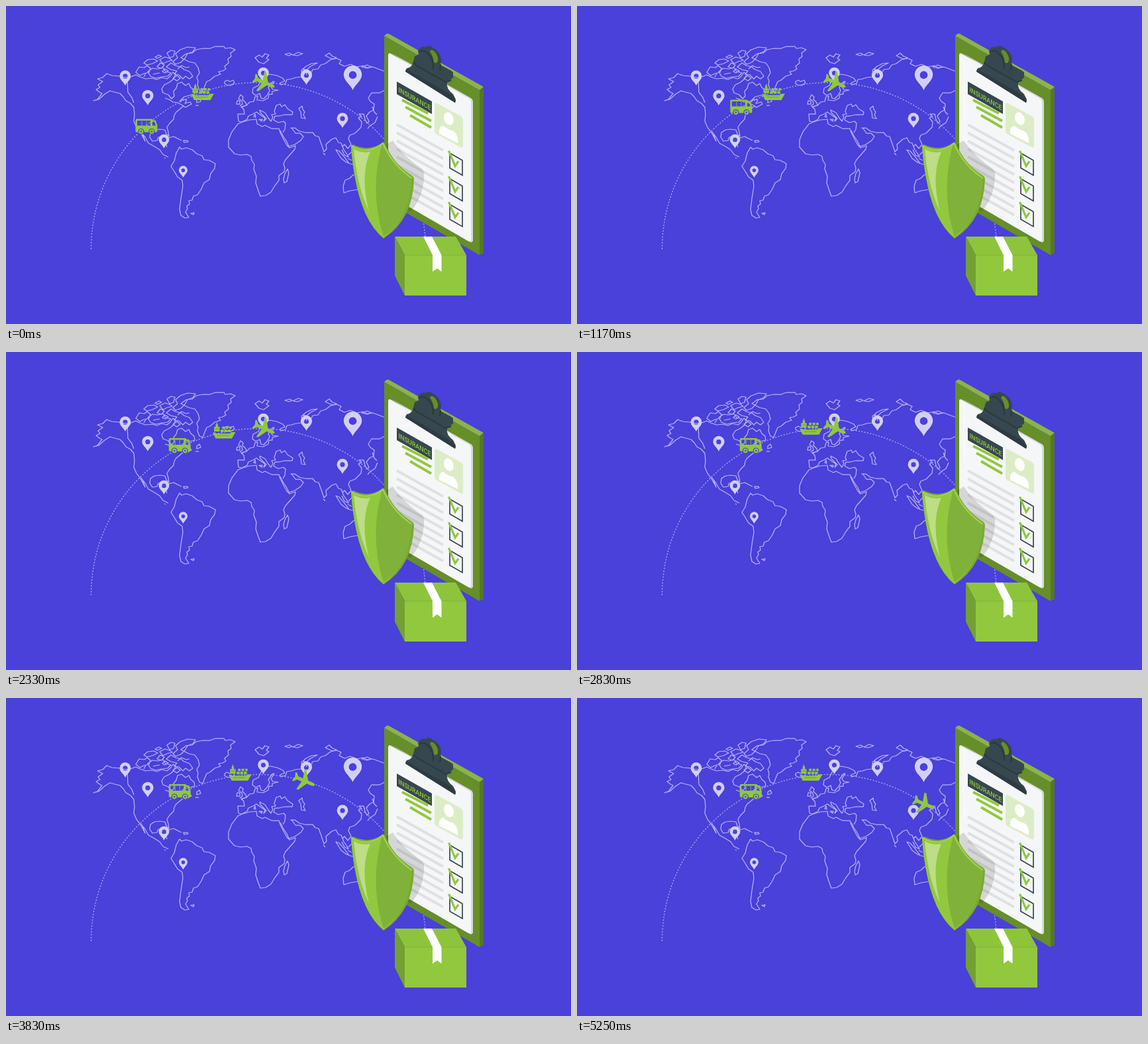
Recreate the animation shown at these times as an HTML page. Size 853 by 480 pixels, loop 5330 ms.

```html
<!DOCTYPE html>
<html lang="en">
<head>
<meta charset="utf-8">
<title>Cargo insurance</title>
<style>
html, body { margin: 0; width: 100%; height: 100%; overflow: hidden; background: #4a40da; }
svg { display: block; width: 100%; height: 100%; }
.map { fill: none; stroke: #b7b1f3; stroke-width: 1.25; stroke-linejoin: round; }
.route { fill: none; stroke: #aaa4ef; stroke-width: 1.4; stroke-dasharray: 2 2.4; }
.pins { fill: #d2cff7; fill-rule: evenodd; }
.icon { fill: #8fc93c; fill-rule: evenodd; }
.label { font: 500 10.4px Roboto, Arial, sans-serif; fill: #92c83e; }
</style>
</head>
<body>
<svg viewBox="0 0 853 480" preserveAspectRatio="none">
  <g class="map">
    <!-- North America -->
    <path d="M138 110l8-2 6-6 8 3 12 1 8 2 8-1 8-3 6 3 9 3 9-1 8 2 7-3 8 2 5-4 4-6 4 3-3 7-6 5-8 4-4 6 2 6 8 3 5 6 4-4-1-7 4-5 2-7 6-2 6 5 5-3 3 6 5 4 1 6-8 2-8 2-7 7 6-3 5 1-3 5 8-2 2 3-9 5-3-2-6 5-5 4-3 5-1 6-6 6-4 6 2 7 1 7-4-4-2-6-8-1-8 1-6 4-1 7 4 6 7-1 2-5 6-1-2 8 7 2 2 6"/>
    <path d="M138 110l8 4-7 5 3 4-6 3 5 4 4 2-7 9-6 2 8-2 9-8 8-5 7 2 8 2 5 5 4 6 7 4 5 6 1 11-1 10 4 9 6 8 7 13-4-11-2-3 6 8 5 9 9 5 8 5 5 7 8 4M183 110l1 20 6 8 3 8"/>
    <path d="M240 139l6 2 6 4 7 1 6 3 4 3M246 199l7-2 8 4 4 2M268 203l6 0 1 2-6 1zM239 229l2 1M286 150l5 0M288 142l4-3 2 5-6 2z"/>
    <!-- Arctic islands -->
    <path d="M196 100l5-8 8 1 4-3 5 4-2 6-8 2-6 3zM208 86l6-5 9-1 6 3-8 4-8 2zM214 99l7-5 8 1 8-2 4 6 8 2-5 5-9 1-9 2-8-3zM228 92l5-6 6 3-4 5zM232 81l8-4 7 2 4 3-8 2-6 3zM242 92l7-6 7 4 8 2 5 4 8 3 5 7-5 4-6-4-4 4-6-6-7-1 4-5-9-2zM243 71l6-4 6 1-2 8-6 2zM252 84l7-6-3-6 7-6 11-4 12 1-4 6-8 3-4 7-6 6-8 3zM225 77l6-3 4 2-7 3zM252 109l6-4 5 4-5 4zM236 99l4-4 5 3-5 3zM208 107l3-5M222 103l10-2M259 95l6-5 7 3 5-1"/>
    <!-- Greenland, Iceland -->
    <path d="M264 78l8-6 9-1 6-5 10-2 11 0 8-3 13 0 2 3 8-1 7 3-7 5 1 5-5 4 1 6-6 5 2 4-5 3-6 1 3 4-9 3-7 6-5 2-3 7-3 8-5-2-3-8 1-6-2-5 4-7-2-8-5-7-9-2zM330 114l4-2 4 2 5-2 2 4-6 4-6-1-3-2z"/>
    <!-- South America -->
    <path d="M257 222l5-9 3 3 7-2 9 3 7 6 8 3 3 6 8 1 9 5-1 7-6 8-2 9-8 5-4 9-6 9-6 2-2 6-5 1 1 5-4 3 1 4-3 5 5 8-6 1-6-4-2-9 2-16 3-19-1-9-7-5-6-10-4-6 5-8zM279 313l5-1-1 3z"/>
    <!-- Europe -->
    <path d="M351 174l-1-11 10 0-1-7-4-4 8-2 5-5 6-1 2-7 4-1-1 6 9 1 8-4 1-6 5 0 0-4 9-2-8-1-3-4 5-8-2 0-7 9 2 5-4 7-5 5-4-1-2-7-6 3-5-4 1-7 8-4 4-8 5-7 9-2 10 2 9 4 3 4-7 3 1 3 7-2 2-6 7-1 6-2 9-1 5-5-2-7 7 2 2 9 5-10 8-1 4-6 7-2 8-6 9-2 7 3-3 5 8 4 9-3 10 4 9-2 6 3 9-1 8 3 8 3 6 1"/>
    <path d="M351 174l5 1 8-4 2-5 7-3 5-3 7 5 6 4-2 5 4-4-9-9-1-4 8 4 5 8 4 5 3-6-2-4 6-1-2-4 3-9 6-2 2 4 5-3 4 6 8 5-1 4-11 0-9 2-6 0-2 6 7 4 8-2 3 3-1 9-3 5M447 151l-5 4 3 5 1 9 6 1-3-6 2-4-3-4zM353 151l4-3-1-5-5-3 3-6 4 3-1 4 5 5 1 4-8 3M348 148l1-5 4 0 0 5zM382 171l5 0-1 3zM374 167l2-4 1 5z"/>
    <path d="M376 78l6-4 5 3 4-5 6 2-4 5 4 2-8 6-7-2zM421 73l7-2 4 2-5 2zM433 74l8-4 7 2-8 3zM447 104l-1-7 7-6 8-4 9-1-10 5-7 6 1 7M482 75l6-4 5 5 6 2-6 2-7-3zM537 92l8-3 7 3-7 2z"/>
    <!-- Africa -->
    <path d="M350 178l7-3 10-3 11-1 1 7 8 4 4-2 10 5 11 0 2 6 5 10 5 9 4 4 9-3-1 5-6 7-8 9-3 6 2 7-1 5-8 6 0 7-6 8-6 10-8 5-8 1-3-8-4-12 1-10-4-11 1-7-4-6-1-6-6-3-10 1-9-2-9-10 0-11 5-12zM425 246l2 6-3 13-4 2-1-6 2-8z"/>
    <!-- Asia -->
    <path d="M414 188l4 8 6 9 3 7 9-3 9-6 4-6-5-5-7 0-5-7-2-1 6 0 7 5 9 2 11 0 4 5 5 1 4 11 4 12 4-4-1-7 9-8 6-2 4 7 4 1 4 10 5 7 2 4-6-3-4-8M508 212l3-3 5 6 5-6-4-9 2-5 8-3 9-9 1-8-5-6 5-2-4-4 7 0 2 8 3 6 3-3-4-8 5-6 6-3 1-9-6-4-3-5 5-8 12 0 10-5 5-1M553 152l3 8 4 4M561 167l-4 9-8 5-3 4M498 217l5 2 8 9 6 8-3 0-8-6zM516 237l10 3M517 225l5-5M516 230l6 3M510 282l-1-10 3-9 7-3 5-5 8-2M510 282l9-3 12-2M479 222l3 3"/>
  </g>
  <path class="route" d="M128.500 367A252.500 251.500 0 0 1 633.500 367"/>
  <g class="pins" id="pins"></g>

  <g class="icon">
    <g id="bus">
      <path d="M-16.500-9q0-2 2-2H8q2 0 2.500 2H14l2.500 8V7q0 2-2 2h-29q-2 0-2-2zM-14-8.500V-1H6v-7.500zM9-6.500V-1h5l-1.600-5.500z"/>
      <path d="M-7-8v7M0-8v7" stroke="#8fc93c" stroke-width=".8"/>
      <g stroke="#4a40da" stroke-width="1.200"><circle cx="-8" cy="8" r="4"/><circle cx="8" cy="8" r="4"/></g>
      <g fill="#4a40da"><circle cx="-8" cy="8" r="1.300"/><circle cx="8" cy="8" r="1.300"/></g>
    </g>
    <g id="ship">
      <path d="M-17 2.500h4l1.500 1.500H9l2-2h6.500L12 11.500h-24.500zM-15 1v-7h2.500v-4h1v-2.500h1.500v2.500h1v4h2.500v7zM-5-2h4.500v4H-5zM.5-2H5v4H.5zM6-2h4.500v3L9 2H6zM-3-6.500h4v3.500h-4zM2.500-6.500h4v3.500h-4zM8-6.500h3.500v3.500H8z"/>
      <path d="M-13-3h5.500M-10 7H8" stroke="#4a40da" stroke-width=".7" opacity=".6"/>
    </g>
    <g id="plane"><path transform="rotate(23)" d="M17 0Q16-2.600 11-2.600H5L-3.500-16H-6.500L-3.500-2.600H-11L-15-7H-17.500L-15.500 0-17.500 7H-15L-11 2.600H-3.500L-6.500 16H-3.500L5 2.600H11Q16 2.600 17 0z"/></g>
  </g>

  <!-- Clipboard -->
  <path fill="#668e29" d="M571 45l144 82v249l-144-83z"/>
  <path fill="#8bb448" d="M571 45l3-2.500q2-1.500 4-.5L721 122l-6 5z"/>
  <path fill="#557821" d="M715 127l6-5v251l-6 3z"/>
  <path fill="#d5d9dc" d="M580 70l122 69q3 2 3 5v211l-3 2-5-4V145z"/>
  <path fill="#f5f6f7" d="M577 74q0-4 4-2l117 67q4 2 4 6v208q0 4-4 2L577 285z"/>
  <path fill="#37474f" d="M603 99l2-5q8-1 10-10l2-8 6-3-1-5q3-8 12-6 3-4 9 0 12 6 14 18l-1 9 15 8 4 3v8l-9 7q-2 10 9 18l4 8-1 5z"/>
  <path fill="#668e29" d="M640 69q2-6 8 1 5 6 4 13-2 5-6 2-1-9-6-16z"/>
  <path fill="none" stroke="#2b383f" stroke-width="2" d="M625 69q5-4 12 3 9 8 8 23M656 88l-1 9M615 85l5 5 44 25 8-3"/>
  <path fill="#2d3b43" d="M603 99l1-4 68 39 7 9-1 3z"/>
  <path fill="#37474f" d="M590 114l53 30v19l-53-30z"/>
  <text class="label" transform="matrix(.866 .5 0 1 592.500 129.500)">INSURANCE</text>
  <path fill="none" stroke="#92c83e" stroke-width="3.800" d="M598 142l39 20M603 152.500l39 21M610 165l32 18.500"/>
  <path fill="#dcedc6" d="M647 149q0-4 4-2l35 19q4 2 4 6v39q0 4-4 2l-35-19q-4-2-4-6z"/>
  <ellipse cx="668.500" cy="170" rx="7" ry="10" transform="rotate(-20 668.500 170)" fill="#fff"/>
  <path fill="#fff" d="M654 193v-5q1-8 7-7 6 6 13 7 7 4 8 13v6z"/>
  <g id="lines" stroke="#dfe0e3" stroke-width="4"></g>
  <g id="checks" fill="none"></g>

  <!-- Shield -->
  <path fill="#000" opacity=".13" d="M571 211l13-8q14 22 44 43 4 3 3 14-2 30-20 50l-40-18z"/>
  <path fill="#7aaa30" d="M521 212q0-2 3-3 11 6 24 5 10-1 19-7 3-2 5 0 13 32 41 49 3 2 3 5-2 62-46 90-41-33-49-139z"/>
  <path fill="#92c83e" d="M521 212q15 8 27 6 12-2 20-10 12 32 44 53-2 57-42 89-41-33-49-138z"/>
  <path fill="#80b13a" d="M568 208q12 32 44 53-2 57-42 87-22-68-2-140z"/>
  <path fill="#bddd87" d="M525 216q12 7 25 4-16 35-2 90-18-37-23-94z"/>
  <path fill="none" stroke="#a6d253" stroke-width="2" d="M521 211q15 8 27 6 12-2 21-10 14 33 44 53"/>

  <!-- Parcel -->
  <path fill="#8ec43c" d="M587 348h92l16 28h-93z"/>
  <path fill="#73a033" d="M587 348l15 28v61l-15-30z"/>
  <path fill="#92c83e" d="M602 376h93v61h-93z"/>
  <path stroke="#7dad35" stroke-width=".8" d="M602 376h93"/>
  <path fill="#fff" d="M630 348h13l14.500 28v25l-6.500-5-7 5v-25z"/>
</svg>
<script>
const $ = id => document.getElementById(id);

// x of tip, y of tip, height
const pins = [[180, 120, 22.5], [214, 150, 23], [238.5, 215, 21], [267.5, 259, 17.5],
  [388.5, 115, 22], [453.5, 119, 23], [508, 184, 22.5], [523.5, 127, 36.5]];
$('pins').innerHTML = pins.map(([x, y, h]) =>
  `<path transform="translate(${x} ${y}) scale(${h / 36})" d="M0 0C-3-8-13.500-14-13.500-23A13.500 13.500 0 0 1 13.500-23C13.500-14 3-8 0 0zM-5.800-22.500a5.800 5.800 0 1 0 11.600 0a5.800 5.800 0 1 0-11.600 0z"/>`).join('');

let html = '';
for (let i = 0; i < 9; i++) html += `<path d="M590 ${179 + i * 12.2}l70 39"/>`;
$('lines').innerHTML = html;

$('checks').innerHTML = [0, 1, 2].map(i =>
  `<g transform="translate(0 ${i * 38.7})"><path stroke="#37474f" stroke-width="1.7" d="M670 222l19 11v22.500l-19-11z"/>
   <path stroke="#8fc93c" stroke-width="3.2" d="M668.500 218.500l9.500 23 5-7"/></g>`).join('');

// time, x, y
const tracks = {
  bus: [[0, 212, 181.5], [1170, 248, 152.5], [1670, 262.3, 141]],
  ship: [[1670, 296.5, 130.5], [1830, 304.5, 127.5], [2330, 329, 119], [2830, 353.2, 113.2]],
  plane: [[2830, 390, 115.5], [3330, 421, 118], [3830, 450.5, 125], [4420, 481, 136], [4830, 503, 147], [5250, 524.5, 160], [5330, 528.5, 163]]
};

function at(keys, t) {
  let i = 0;
  while (i < keys.length - 2 && t > keys[i + 1][0]) i++;
  const [a, b] = [keys[i], keys[i + 1]];
  const k = Math.min(1, Math.max(0, (t - a[0]) / (b[0] - a[0])));
  return [a[1] + (b[1] - a[1]) * k, a[2] + (b[2] - a[2]) * k];
}

const LOOP = 5330, STEP = LOOP / 64;

function draw() {
  const now = performance.now() % LOOP;
  const t = Math.floor(now / STEP + 0.08) * STEP % LOOP;
  for (const id in tracks) $(id).setAttribute('transform', `translate(${at(tracks[id], t)})`);
  requestAnimationFrame(draw);
}
draw();
</script>
</body>
</html>
```
